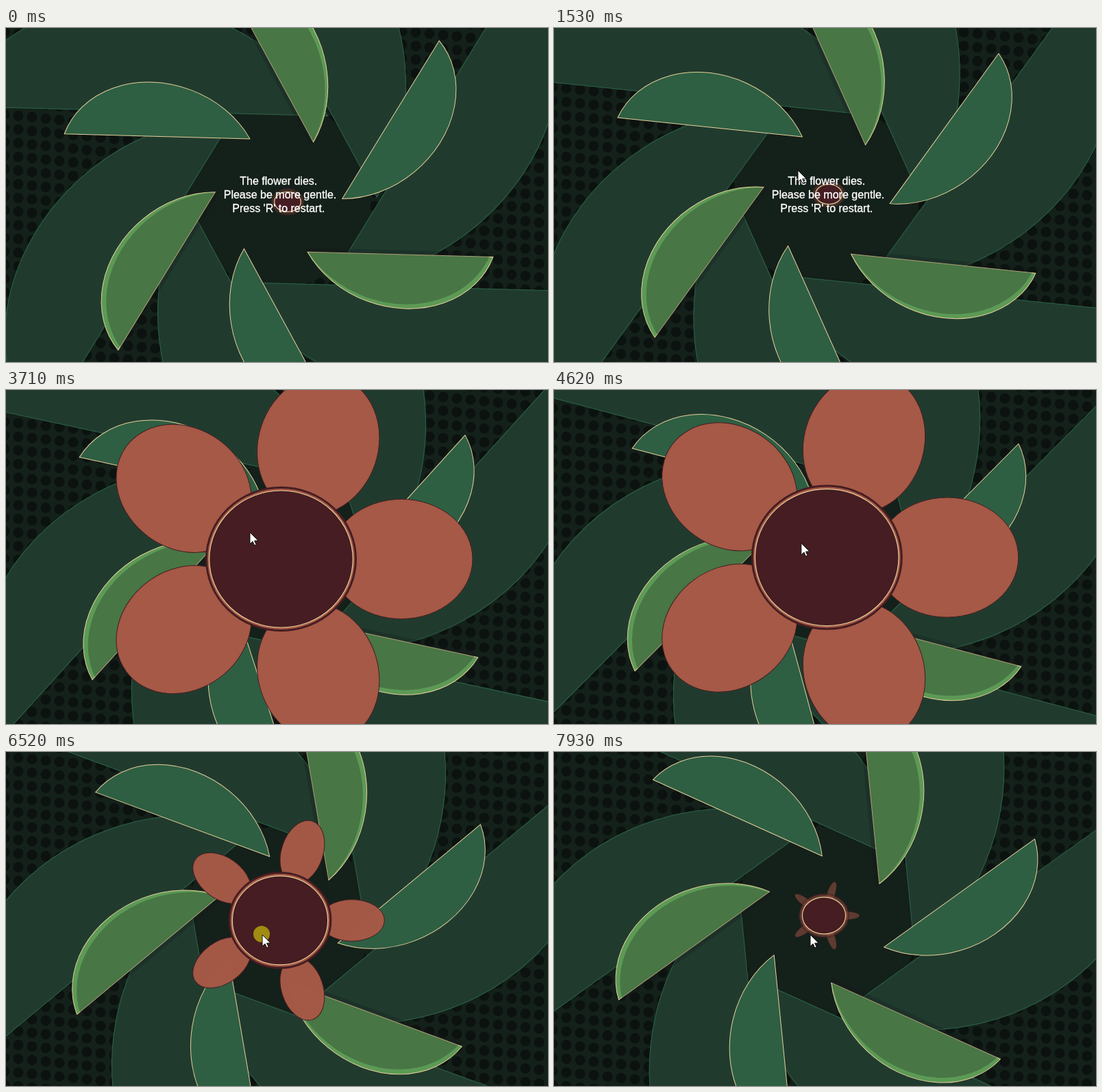
Animation of 791 by 488 pixels, one loop 8000 ms. Source, as an HTML page with a canvas:

```html
<!DOCTYPE html>
<html lang="en">
<head>
<meta charset="utf-8">
<title>Flower</title>
<style>
  html, body { margin: 0; width: 100%; height: 100%; overflow: hidden; background: #14201a; }
  canvas { display: block; }
</style>
</head>
<body>
<canvas id="stage" width="791" height="488"></canvas>
<script>
const ctx = document.getElementById('stage').getContext('2d');
const LOOP = 8000, TAU = Math.PI * 2, DEG = Math.PI / 180;
const RESTART = 3200, PRESS = 5220, RELEASE = 7800;
const FULL = 110.5, DEAD = 25, SHRINK = 0.027;
const SOIL = '#14201a', MAROON = '#451d22', CORAL = '#a55946', CREAM = '#e8cf9a';

// Drift of the bloom: time, x, y
const DRIFT = [
  [0, 411, 254], [500, 402, 244], [1530, 401, 243], [2650, 401, 247], [3710, 401.5, 247],
  [5390, 395.5, 242.5], [6520, 400, 246], [7930, 394, 239]
];
// Petal shape by disc radius: radius, half length, half width, distance, opacity
const BLOOM = [
  [25, 0, 0, 20, 0.3], [37, 18, 5.5, 33, 0.5], [76, 48, 30.8, 106, 1],
  [105.5, 91, 75, 166.5, 1], [110.5, 104, 87.5, 175.5, 1]
];
const POINTER = [[0, 0], [0, 17], [4, 13.2], [6.6, 19], [9.2, 18], [6.6, 12.3], [12, 12]];
// The trailing spaces count in the centring
const MESSAGE = ['The flower dies. ', 'Please be more gentle.', "Press 'R' to restart. "];

const clamp = (v, lo, hi) => Math.min(hi, Math.max(lo, v));

function track(rows, key) {
  let i = 1;
  while (i < rows.length - 1 && rows[i][0] < key) i++;
  const a = rows[i - 1], b = rows[i];
  const k = clamp((key - a[0]) / (b[0] - a[0]), 0, 1);
  return a.slice(1).map((v, n) => v + (b[n + 1] - v) * k);
}

function paint(fill, stroke, width = 1) {
  if (fill) { ctx.fillStyle = fill; ctx.fill(); }
  if (stroke) { ctx.strokeStyle = stroke; ctx.lineWidth = width; ctx.stroke(); }
}

function ellipse(x, y, rx, ry, fill, stroke, width) {
  ctx.beginPath();
  ctx.ellipse(x, y, rx, ry, 0, 0, TAU);
  paint(fill, stroke, width);
}

// Elliptic arc closed by its chord
function blade(x, y, scale, fill, stroke) {
  ctx.beginPath();
  ctx.ellipse(x, y, 150 * scale, 125 * scale, 0, 0, 0.75 * Math.PI);
  ctx.closePath();
  paint(fill, stroke);
}

function around(x, y, count, turn, draw) {
  for (let i = 0; i < count; i++) {
    ctx.save();
    ctx.translate(x, y);
    ctx.rotate(turn + i * TAU / count);
    draw(i);
    ctx.restore();
  }
}

function background() {
  ctx.fillStyle = SOIL;
  ctx.fillRect(0, 0, 791, 488);
  ctx.beginPath();
  for (let x = -2; x < 800; x += 20) {
    for (let y = (6.5 + x / 10) % 20 - 20; y < 500; y += 20) {
      ctx.moveTo(x + 7.5, y);
      ctx.arc(x, y, 7.5, 0, TAU);
    }
  }
  paint('#0b120f');
  ellipse(398, 244.5, 135, 135, SOIL);
}

function foliage(t) {
  const turn = (20.55 + t * 0.002877) * DEG;
  const shift = 1 - clamp(t / 500, 0, 1);
  around(398 + 4.5 * shift, 244.5 + 5.5 * shift, 6, turn,
    () => blade(192, -39.5, 2, '#203b2e', '#2c6449'));
  around(398, 244.6, 6, turn, i => {
    const light = i % 2 === 0;
    blade(174.5, -25.7, 1, light ? '#5c9a56' : '#2e5f43', CREAM);
    if (light) blade(169.5, -30.7, 1, 'rgba(20, 24, 22, 0.27)');
  });
}

function bloom(t) {
  const alive = t >= RESTART;
  const r = alive ? clamp(FULL - Math.max(0, t - PRESS) * SHRINK, DEAD, FULL) : DEAD;
  const [x, y] = track(DRIFT, t);
  const [rx, ry, reach, alpha] = track(BLOOM, r);
  ctx.globalAlpha = alpha;
  if (rx > 0.5) around(x, y, 5, 0, () => {
    ellipse(reach, 0, rx, ry, CORAL, MAROON);
  });
  ellipse(x, y, r - 1.5, r - 6, CORAL, MAROON, 3);
  ctx.globalAlpha = 1;
  ellipse(x, y, r - 5.7, r - 10.5, MAROON, CREAM, 1.2);
}

function message() {
  ctx.font = '16px "Liberation Sans", Arial, sans-serif';
  ctx.textAlign = 'center';
  ctx.lineJoin = 'round';
  ctx.fillStyle = ctx.strokeStyle = '#fff';
  ctx.lineWidth = 0.35;
  MESSAGE.forEach((line, i) => {
    ctx.fillText(line, 400, 229 + i * 20);
    ctx.strokeText(line, 400, 229 + i * 20);
  });
}

function pointer(t) {
  const [x, y] = track([[4500, 356, 208], [4950, 374, 267]], t);
  if (t >= PRESS && t < RELEASE) ellipse(373, 266, 12, 12, '#a08c12');
  ctx.beginPath();
  POINTER.forEach(([dx, dy]) => ctx.lineTo(x + dx, y + dy));
  ctx.closePath();
  paint('#fff', '#111');
}

function frame() {
  const t = performance.now() % LOOP;
  background();
  foliage(t);
  bloom(t);
  if (t < RESTART) message();
  if (t > 400) pointer(t);
  requestAnimationFrame(frame);
}
frame();
</script>
</body>
</html>
```
